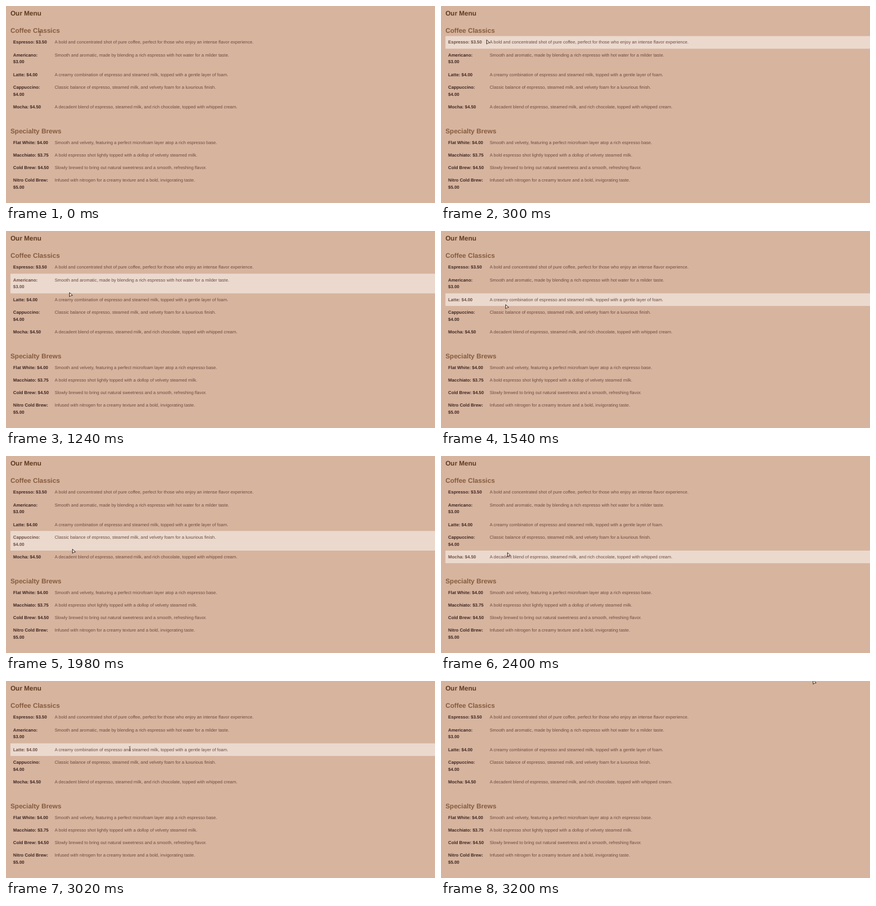
These frames come from a looping animation (720 px wide and 331 px high, 3.22 s). An HTML page:

```html
<!DOCTYPE html>
<html lang="en">
<head>
<meta charset="utf-8">
<title>Our Menu</title>
<style>
  html, body { margin: 0; width: 100%; height: 100%; overflow: hidden; background: #d7b49e; }
  svg { display: block; width: 720px; height: 331px; }
  text { font: 16px "Liberation Sans", Arial, sans-serif; fill: #6d4c41; text-rendering: geometricPrecision; }
  .title, .section { font-size: 24px; font-weight: bold; }
  .title { fill: #5d3a1f; }
  .section { fill: #855b3e; }
  .name { font-weight: bold; fill: #3e2723; }
  .hover .name { fill: #6d4c41; }
  .row rect { fill: #fff; fill-opacity: 0; }
  .hover rect { fill-opacity: .5; }
</style>
</head>
<body>
<svg viewBox="0 0 720 331">
  <g id="page"></g>
  <g id="cursor">
    <path id="arrow" d="M.5 .4V7.4L2.4 5.9L5.7 5.1Z" fill="#f3e6de" stroke="#33241f" stroke-width=".9" stroke-linejoin="round"/>
    <path id="beam" d="M-1.6 -3.6Q0 -3.6 0 -2.6Q0 -3.6 1.6 -3.6M0 -2.6V2.6M-1.6 3.6Q0 3.6 0 2.6Q0 3.6 1.6 3.6" fill="none" stroke="#4f3b32" stroke-width=".7"/>
  </g>
</svg>
<script>
const LOOP = 3220, PAGE_WIDTH = 1552, SCALE = 720 / PAGE_WIDTH;
const MARGIN = 16, LINE = 25.6, PADDING = 10;

const sections = [
  { title: "Coffee Classics", y: 97.4, items: [
    ["Espresso:", "$3.50", "A bold and concentrated shot of pure coffee, perfect for those who enjoy an intense flavor experience."],
    ["Americano:", "$3.00", "Smooth and aromatic, made by blending a rich espresso with hot water for a milder taste.", true],
    ["Latte:", "$4.00", "A creamy combination of espresso and steamed milk, topped with a gentle layer of foam."],
    ["Cappuccino:", "$4.00", "Classic balance of espresso, steamed milk, and velvety foam for a luxurious finish.", true],
    ["Mocha:", "$4.50", "A decadent blend of espresso, steamed milk, and rich chocolate, topped with whipped cream."],
  ] },
  { title: "Specialty Brews", y: 460.4, items: [
    ["Flat White:", "$4.00", "Smooth and velvety, featuring a perfect microfoam layer atop a rich espresso base."],
    ["Macchiato:", "$3.75", "A bold espresso shot lightly topped with a dollop of velvety steamed milk."],
    ["Cold Brew:", "$4.50", "Slowly brewed to bring out natural sweetness and a smooth, refreshing flavor."],
    ["Nitro Cold Brew:", "$5.00", "Infused with nitrogen for a creamy texture and a bold, invigorating taste.", true],
  ] },
];

// Cursor path: time in ms, x, y
const path = [
  [0, 57, 46], [40, 57, 46], [560, 95, 67], [660, 95, 67], [780, 96.5, 69],
  [1240, 106, 103], [1700, 109, 134], [1760, 109, 134], [1980, 111, 156],
  [2080, 111, 162], [2400, 111, 162], [2840, 118, 141.4], [2940, 120, 138],
  [3060, 250, 102], [3200, 624, -2], [LOOP, 624, -2],
];

const page = document.getElementById("page");
const cursor = document.getElementById("cursor");
const arrow = document.getElementById("arrow");
const beam = document.getElementById("beam");
const rows = [];

function add(parent, tag, attributes, content = "") {
  const node = document.createElementNS("http://www.w3.org/2000/svg", tag);
  for (const key in attributes) node.setAttribute(key, attributes[key]);
  node.textContent = content;
  return parent.appendChild(node);
}

function addRow(top, [name, price, description, wraps]) {
  const height = 2 * PADDING + LINE * (wraps ? 2 : 1);
  const node = add(page, "g", { class: "row" });
  const baseline = top + 27.6;
  add(node, "rect", { x: MARGIN, y: top, width: PAGE_WIDTH - MARGIN, height });
  add(node, "text", { class: "name", x: 26, y: baseline }, wraps ? name : `${name} ${price}`);
  if (wraps) add(node, "text", { class: "name", x: 26, y: baseline + LINE }, price);
  add(node, "text", { x: 176, y: baseline }, description);
  rows.push({ node, top, bottom: top + height });
  return top + height;
}

page.setAttribute("transform", `scale(${SCALE})`);
add(page, "text", { class: "title", x: MARGIN, y: 34 }, "Our Menu");
for (const { title, y, items } of sections) {
  add(page, "text", { class: "section", x: MARGIN, y }, title);
  items.reduce(addRow, y + 11.6);
}
const textBoxes = [...page.querySelectorAll("text")].map(node => node.getBBox());

function cursorAt(time) {
  const next = path.findIndex(point => point[0] > time);
  const [t0, x0, y0] = path[next - 1], [t1, x1, y1] = path[next];
  const k = (time - t0) / (t1 - t0);
  return [x0 + (x1 - x0) * k, y0 + (y1 - y0) * k];
}

function draw(time) {
  const [x, y] = cursorAt(time);
  const px = x / SCALE, py = y / SCALE;
  for (const { node, top, bottom } of rows) {
    node.classList.toggle("hover", px >= MARGIN && py >= top && py < bottom);
  }
  const overText = textBoxes.some(b => px >= b.x && px < b.x + b.width && py >= b.y && py < b.y + b.height);
  arrow.style.display = overText ? "none" : "";
  beam.style.display = overText ? "" : "none";
  cursor.setAttribute("transform", `translate(${x} ${y})`);
}

const start = performance.now();
function tick() {
  draw((performance.now() - start) % LOOP);
  requestAnimationFrame(tick);
}
tick();
</script>
</body>
</html>
```
